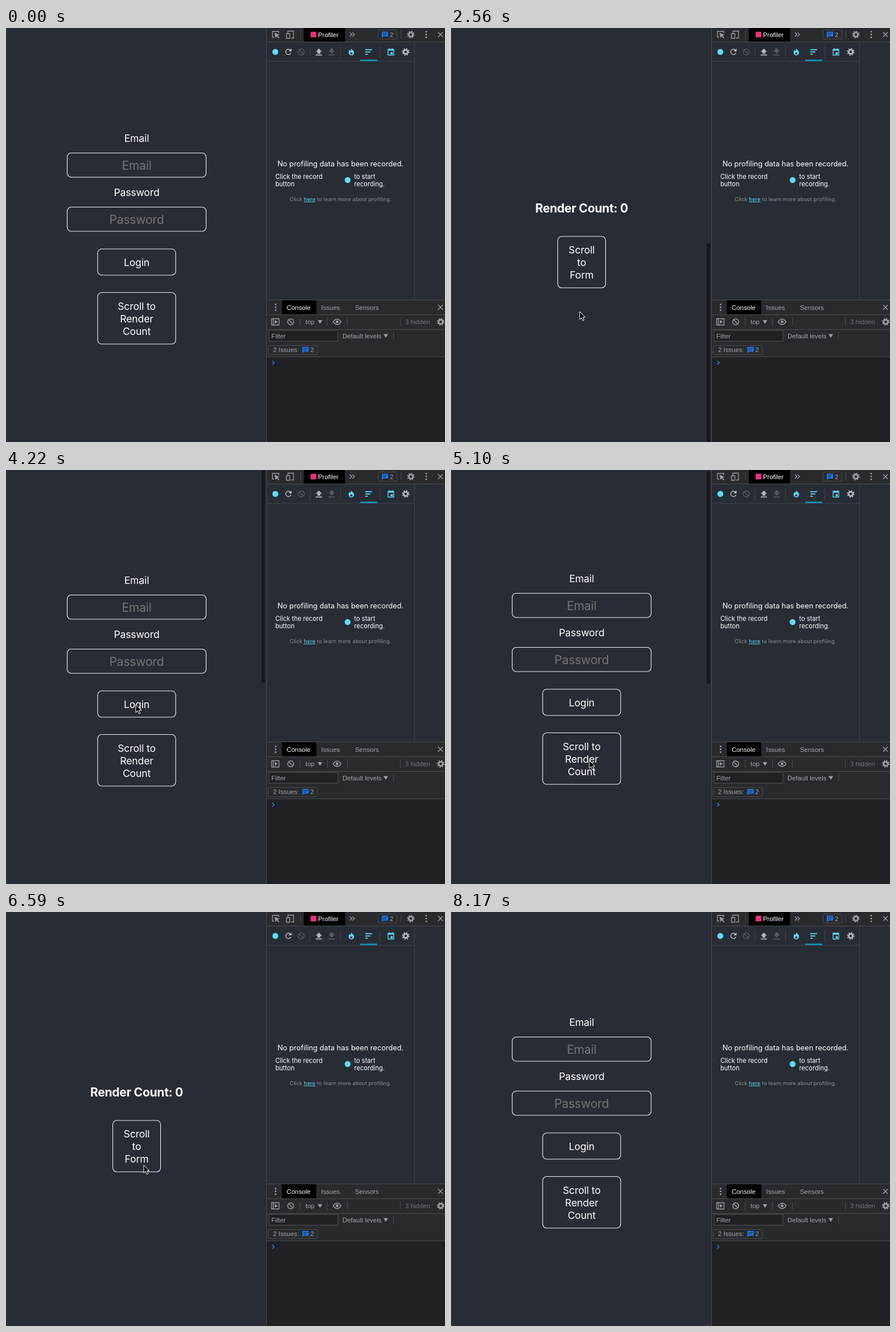
Write an HTML page that moves like this. It is 771x727 px and loops after 8.7 s.

```html
<!DOCTYPE html>
<html lang="en">
<head>
<meta charset="utf-8">
<title>Scroll between form and render count</title>
<style>
  html, body { margin: 0; width: 100%; height: 100%; overflow: hidden; background: #282c34; }
  svg { display: block; position: absolute; left: 0; top: 0; }
  text { white-space: pre; }
  .page { font: 17.5px Inter, sans-serif; letter-spacing: -.1px; fill: #fff; text-anchor: middle; }
  .page .hint { font-size: 21px; letter-spacing: -.15px; fill: #757575; }
  .page .head { font-size: 21px; font-weight: 700; letter-spacing: -.25px; }
  .box { fill: none; stroke: #f4f4f5; stroke-width: 1.1; }
  .tools { font: 11.4px "Liberation Sans", Arial, sans-serif; fill: #a2a7ad; }
  .react { font: 11.1px Inter, sans-serif; fill: #fff; }
  .react .title { font-size: 12.8px; }
  .react .small { font-size: 9.1px; letter-spacing: .2px; fill: #8f949d; }
  .react .link { fill: #61dafb; text-decoration: underline; }
  .line { fill: none; stroke: #9aa0a6; stroke-width: 1.3; }
  .sep { fill: none; stroke: #484b50; }
  .pale { stroke: #c2c6cb; }
  .dim { stroke: #555a63; }
  .cyan { stroke: #61dafb; }
</style>
</head>
<body>
<svg width="771" height="727" viewBox="0 0 771 727">
  <defs>
    <g id="gear" fill="none">
      <circle r="3.6" stroke-width="2.6"/>
      <circle r="5.6" stroke-width="2" stroke-dasharray="2.2"/>
    </g>
    <path id="cross" class="line" d="M-4.2-4.2 4.2 4.2M4.2-4.2-4.2 4.2"/>
    <g id="dots" fill="#9aa0a6">
      <circle cy="-5" r="1.4"/><circle r="1.4"/><circle cy="5" r="1.4"/>
    </g>
    <g id="ban" fill="none" stroke-width="1.4">
      <circle r="5.3"/><path d="M-3.7-3.7 3.7 3.7"/>
    </g>
    <g id="note">
      <path d="M0 0H11V8.5H3L0 11Z" fill="#1a73e8"/>
      <path d="M2 2.8H9M2 5.6H7" stroke="#292a2d" stroke-width="1.1"/>
    </g>
    <path id="drop" d="M-4-3H4L0 3.5Z" fill="#9aa0a6"/>
  </defs>

  <rect width="771" height="727" fill="#282c34"/>
  <rect width="1.5" height="727" fill="#31353e"/>

  <g id="page" class="page">
    <text x="229.5" y="199.5">Email</text>
    <rect class="box" x="107.5" y="219.5" width="244" height="42.5" rx="7"/>
    <text class="hint" x="229.5" y="248.5">Email</text>
    <text x="229.5" y="295">Password</text>
    <rect class="box" x="107.5" y="314.5" width="244" height="42.5" rx="7"/>
    <text class="hint" x="229.5" y="344">Password</text>
    <rect class="box" x="161" y="388" width="137" height="46" rx="7"/>
    <text x="229.5" y="418">Login</text>
    <rect class="box" x="161" y="464.5" width="137" height="90.5" rx="7"/>
    <text x="229.5" y="495">Scroll to</text>
    <text x="229.5" y="517.2">Render</text>
    <text x="229.5" y="539.4">Count</text>
    <g transform="translate(0 754)">
      <text class="head" x="229.5" y="324">Render Count: 0</text>
      <rect class="box" x="187.5" y="366" width="84" height="90.3" rx="7"/>
      <text x="229.5" y="396">Scroll</text>
      <text x="229.5" y="418.2">to</text>
      <text x="229.5" y="440.4">Form</text>
    </g>
  </g>
  <rect id="thumb" x="449" y="1" width="6" height="373" rx="3" fill="#16181c"/>

  <!-- panel surfaces -->
  <rect x="458" width="313" height="727" fill="#282c34"/>
  <rect x="458" width="313" height="25" fill="#292a2d"/>
  <rect x="458" y="477" width="313" height="100" fill="#292a2d"/>
  <rect x="458" y="577" width="313" height="150" fill="#202124"/>
  <path class="sep" d="M457.5 0V727M458 24.5H771M458 477.5H771M458 503.5H771M458 529.5H771M458 577.5H771"/>
  <path d="M458 58.5H717M717.5 25V477M533.5 32V52M587.5 32V52M656.5 32V52" stroke="#3f434b"/>
  <path class="sep" d="M517.5 4V19M693.5 4V19M516.5 509V523M564.5 509V523M599.5 509V523M692.5 509V523M680.5 533V547"/>
  <rect x="523" width="72.500" height="24" fill="#000"/>
  <rect x="484.500" y="478" width="60.500" height="25" fill="#000"/>

  <!-- top tab bar -->
  <g class="tools">
    <path class="line" d="M471 16H468V6H479V9"/>
    <path d="M471.500 8.500 480.500 12 477 13.300 480 17 478.600 18.200 475.500 14.500 473.500 17.500Z" fill="#9aa0a6"/>
    <path class="line" d="M495 9V5.500H505V17.500H501M492.500 10H498.500V18H492.500Z"/>
    <rect x="535" y="6.500" width="10" height="10" rx="1.500" fill="#e8307f"/>
    <text x="548" y="15.500" fill="#fff">Profiler</text>
    <path class="line" d="M604 8 607.500 11.500 604 15M608.500 8 612 11.500 608.500 15"/>
    <rect class="sep" x="653.500" y="3.500" width="33" height="16" rx="2"/>
    <use href="#note" x="660" y="6.500"/>
    <text x="674" y="15.500">2</text>
    <use href="#gear" x="711" y="11.500" stroke="#9aa0a6"/>
    <use href="#dots" x="738" y="11.500"/>
    <use href="#cross" x="763" y="11.500"/>
  </g>

  <!-- profiler toolbar -->
  <circle cx="473" cy="42" r="5.200" fill="#61dafb"/>
  <path class="line pale" stroke-width="1.600" d="M499.700 39A4.700 4.700 0 1 0 500.500 43.500"/>
  <path d="M501.500 36V41H496.500Z" fill="#c2c6cb"/>
  <use href="#ban" x="518.500" y="42" class="dim"/>
  <path d="M549.500 36 555 41.800H552V45H547V41.800H544ZM544 46.500H555V48.300H544Z" fill="#b4b8be"/>
  <path d="M572 45 577.500 39.500H574.500V36H569.500V39.500H566.500ZM566.500 46.500H577.500V48.300H566.500Z" fill="#555a63"/>
  <path d="M606 35.500C607 38 611.300 39.500 611.300 43.300A4.800 4.800 0 0 1 601.700 43.300C601.700 41 602.600 39.500 603.700 38.300 603.900 39.500 604.300 40 605 40.200 606 39 606.300 37.500 606 35.500Z" fill="#61dafb"/>
  <ellipse cx="606.500" cy="44.800" rx="1.900" ry="2" fill="#282c34"/>
  <path d="M631 38.200H643M631 42.200H640M631 46.200H635.500" stroke="#61dafb" stroke-width="1.700"/>
  <rect x="622" y="55.500" width="30" height="2.700" fill="#178fb9"/>
  <path class="line cyan" d="M671 37.500H681V47.500H671ZM671 39H681M673.500 35.500V38M678.500 35.500V38"/>
  <rect x="675.500" y="42.500" width="3.800" height="3.500" fill="#61dafb"/>
  <use href="#gear" x="702" y="42" stroke="#b4b8be"/>

  <!-- profiler message -->
  <g class="react">
    <text class="title" x="587.500" y="243" text-anchor="middle">No profiling data has been recorded.</text>
    <text x="473" y="264.500">Click the record</text>
    <text x="473" y="277.500">button</text>
    <circle cx="600" cy="267" r="5.200" fill="#61dafb"/>
    <text x="611.500" y="264.500">to start</text>
    <text x="611.500" y="277.500">recording.</text>
    <text class="small" x="587.500" y="304" text-anchor="middle">Click <tspan class="link">here</tspan> to learn more about profiling.</text>
  </g>

  <!-- console drawer -->
  <g class="tools">
    <use href="#dots" x="473.500" y="490.500"/>
    <text x="493" y="494.500" fill="#fff">Console</text>
    <text x="553.500" y="494.500">Issues</text>
    <text x="613" y="494.500">Sensors</text>
    <use href="#cross" x="763" y="490.500"/>
    <path class="line" d="M466.500 510.500H479.500V521.500H466.500ZM469.500 510.500V521.500"/>
    <path d="M472 513 477.500 516 472 519Z" fill="#9aa0a6"/>
    <use href="#ban" x="500" y="516" stroke="#9aa0a6"/>
    <text x="526" y="520">top</text>
    <use href="#drop" x="551.500" y="516"/>
    <path class="line" d="M574.500 516Q581.500 506.500 588.500 516 581.500 525.500 574.500 516Z"/>
    <circle cx="581.500" cy="516" r="2.400" fill="#9aa0a6"/>
    <text x="701" y="520" fill="#6f747a">3 hidden</text>
    <use href="#gear" x="763.500" y="516" stroke="#9aa0a6"/>
    <rect x="462" y="531" width="121" height="19" fill="#202124" stroke="#505357"/>
    <text x="466" y="545">Filter</text>
    <text x="591" y="544.500">Default levels</text>
    <use href="#drop" x="667" y="540.500"/>
    <rect class="sep" x="460.500" y="557.500" width="86.500" height="16" rx="2"/>
    <text x="469" y="569">2 Issues:</text>
    <use href="#note" x="520.500" y="560"/>
    <text x="534.500" y="569">2</text>
    <path d="M467.500 584.500 471 587.800 467.500 591" fill="none" stroke="#367cf1" stroke-width="1.500"/>
  </g>

  <path id="cursor" d="M0 0V13.800L3.200 10.900 5.400 16 7.700 15 5.500 10H9.700Z" fill="#000" stroke="#fff" stroke-width="1"/>
</svg>
<script>
  const LOOP = 8700, RANGE = 754, GLIDE = 650;

  // first step, last step, step count, when the glide begins, from, to
  const scrolls = [
    [1950, 2560, 8, 1902, 0, RANGE],
    [3620, 4220, 8, 3581, RANGE, 0],
    [5100, 5721, 8, 5070, 0, RANGE],
    [6860, 7470, 8, 6816, RANGE, 0]
  ];
  const thumbShown = [[1950, 3260], [3620, 4920], [5100, 5810], [6860, 8170]];

  // first step, last step, step count, end x, end y, sideways bow
  const moves = [
    [890, 1510, 8, 226, 498, 0],
    [2920, 3090, 3, 228, 412, 0],
    [4480, 4740, 4, 243, 510, 0],
    [5980, 6590, 8, 242, 444.5, 2.5],
    [7730, 7730, 1, 641, 711, 0]
  ];
  const entry = [-4, 188], cursorShown = [530, 7820];

  const page = document.getElementById("page");
  const thumb = document.getElementById("thumb");
  const cursor = document.getElementById("cursor");

  const within = (t, [a, b]) => t >= a && t < b;
  const show = (el, on) => el.setAttribute("visibility", on ? "visible" : "hidden");
  const place = (el, x, y) => el.setAttribute("transform", `translate(${x} ${y})`);
  const smooth = s => s * s * (3 - 2 * s);

  function stepsDone(t, first, last, n) {
    if (t < first) return 0;
    if (t >= last) return n;
    return 1 + Math.floor((t - first) * (n - 1) / (last - first));
  }

  // cubic-bezier(.42, 0, .58, 1)
  function easeInOut(x) {
    if (x <= 0) return 0;
    if (x >= 1) return 1;
    let lo = 0, hi = 1;
    for (let i = 0; i < 24; i++) {
      const s = (lo + hi) / 2, r = 1 - s;
      if (1.26 * s * r * r + 1.74 * s * s * r + s * s * s < x) lo = s; else hi = s;
    }
    return smooth(lo);
  }

  function scrollAt(t) {
    let top = 0;
    for (const [first, last, n, begin, from, to] of scrolls) {
      const k = stepsDone(t, first, last, n);
      if (!k) break;
      const now = first + (k - 1) * (last - first) / (n - 1);
      top = from + (to - from) * easeInOut((now - begin) / GLIDE);
    }
    return Math.round(top);
  }

  function cursorAt(t) {
    let [x, y] = entry;
    for (const [first, last, n, endX, endY, bow] of moves) {
      const k = stepsDone(t, first, last, n) / n;
      if (!k) break;
      const p = smooth(k);
      x += (endX - x) * p + bow * Math.sin(Math.PI * p);
      y += (endY - y) * p;
    }
    return [x, y];
  }

  function draw(t) {
    const top = scrollAt(t);
    place(page, 0, -top);
    place(thumb, 0, top / 2);
    show(thumb, thumbShown.some(span => within(t, span)));
    place(cursor, ...cursorAt(t));
    show(cursor, within(t, cursorShown));
  }

  const start = performance.now();
  function tick() {
    // small lead so a step lands on its frame despite timer rounding
    draw((performance.now() - start + 3) % LOOP);
    requestAnimationFrame(tick);
  }
  tick();
</script>
</body>
</html>
```
